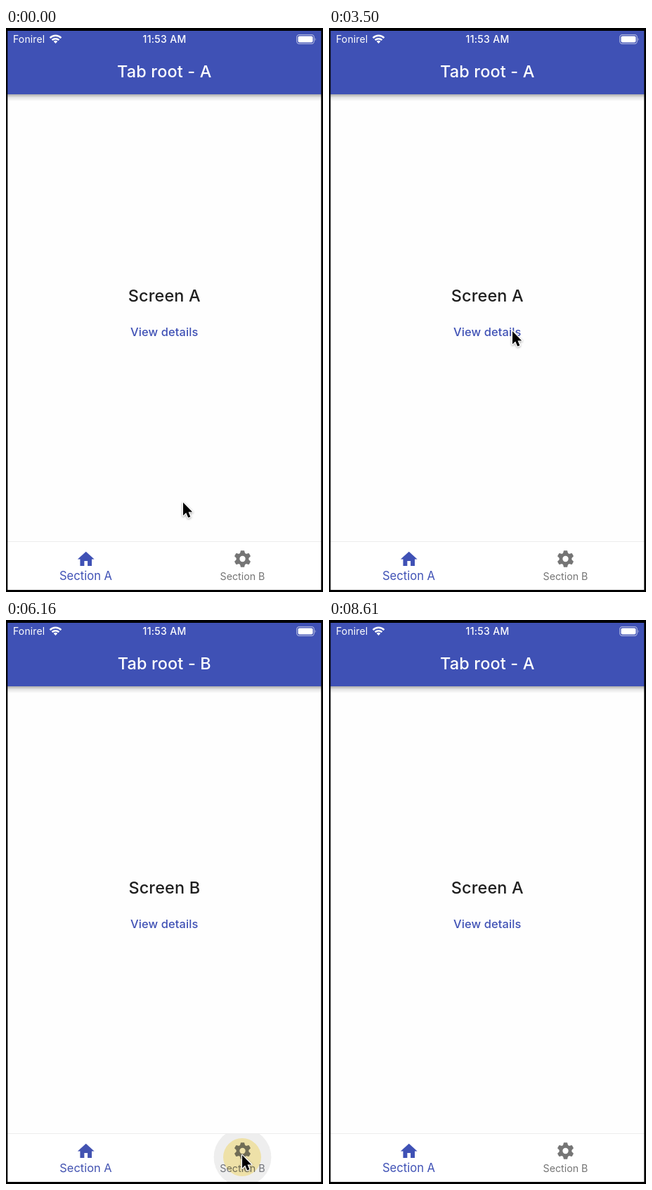
These frames come from a looping animation (451x800 px, 8680 ms). An HTML page:

```html
<!DOCTYPE html>
<html lang="en">
<head>
<meta charset="utf-8">
<title>Tab navigation</title>
<style>
  html, body { margin: 0; width: 100%; height: 100%; overflow: hidden; background: #000; }
  svg { display: block; width: 451px; height: 800px; font-family: Inter, Roboto, sans-serif; }
  text { text-anchor: middle; }
  .title { font-size: 23.4px; font-weight: 500; letter-spacing: .18px; }
  .button { font-size: 16.4px; font-weight: 500; letter-spacing: .13px; fill: #3f51b5; }
  .status { font-size: 14px; fill: #fff; }
  .ink { fill: #bcbcbc; }
</style>
</head>
<body>
<svg viewBox="0 0 451 800">
  <defs>
    <linearGradient id="drop" x2="0" y2="1">
      <stop stop-opacity=".32"/>
      <stop offset=".45" stop-opacity=".1"/>
      <stop offset="1" stop-opacity="0"/>
    </linearGradient>
    <linearGradient id="edge">
      <stop stop-opacity="0"/>
      <stop offset="1" stop-opacity=".12"/>
    </linearGradient>
    <clipPath id="navClip"><rect x="2" y="729" width="447" height="68"/></clipPath>
  </defs>

  <g id="pages"></g>

  <g id="nav">
    <rect y="728" width="451" height="72" fill="#ececec"/>
    <rect y="729" width="451" height="71" fill="#fff"/>
    <g clip-path="url(#navClip)"><g class="ink"></g></g>
    <g id="tabA">
      <path transform="translate(99.5 739.3) scale(1.187)" d="M10 20v-6h4v6h5v-8h3L12 3 2 12h3v8z"/>
      <text font-size="16.6">Section A</text>
    </g>
    <g id="tabB">
      <g id="gear" transform="translate(336.5 753) scale(1.187)">
        <circle r="5.5" fill="none" stroke-width="4"/>
      </g>
      <text font-size="16.6">Section B</text>
    </g>
  </g>

  <g id="statusBar">
    <text class="status" x="10" y="21" letter-spacing=".15" style="text-anchor:start">Fonirel</text>
    <g fill="none" stroke="#fff" stroke-width="2.5">
      <path d="M62.6 14.1a11.2 11.2 0 0 1 15.8 0M65.6 17.2a6.9 6.9 0 0 1 9.8 0"/>
      <path d="M70.5 22l-2.8-2.9a4 4 0 0 1 5.6 0z" fill="#fff" stroke="none"/>
    </g>
    <text class="status" x="225.5" y="21" font-weight="500" letter-spacing=".3">11:53 AM</text>
    <rect x="413.7" y="9.7" width="24.6" height="12.6" rx="3.6" fill="none" stroke="#fff" stroke-opacity=".55" stroke-width="1.2"/>
    <rect x="415.5" y="11.5" width="21" height="9" rx="2" fill="#fff"/>
    <path d="M439.6 13.7q2 2.3 0 4.6z" fill="#fff" fill-opacity=".55"/>
  </g>

  <path d="M0 0H451V800H0zM2.3 4V797H448.3V4z" fill-rule="evenodd"/>
  <circle id="halo" r="27" fill="#fff2b4" style="mix-blend-mode:multiply"/>
  <g id="cursor">
    <path d="M0 0V18.5L4.2 14.6 7.2 21.6 10.4 20.2 7.5 13.4H13.2Z" stroke="#fff" stroke-width="2.4"
      stroke-linejoin="round" paint-order="stroke" style="filter:drop-shadow(0 1.5px 1.5px rgba(0,0,0,.35))"/>
  </g>
</svg>

<script>
const LOOP = 8680, STEP = 70;
const $ = id => document.getElementById(id);
const clamp = v => Math.max(0, Math.min(1, v));
const mix = (a, b, k) => a + (b - a) * k;

function add(parent, tag, attrs) {
  const el = document.createElementNS('http://www.w3.org/2000/svg', tag);
  return parent.appendChild(set(el, attrs));
}
function set(el, attrs) {
  for (const key in attrs) el.setAttribute(key, attrs[key]);
  return el;
}

function bezier(x1, y1, x2, y2) {
  const at = (a, b, s) => 3 * a * s * (1 - s) ** 2 + 3 * b * s * s * (1 - s) + s ** 3;
  return x => {
    let lo = 0, hi = 1;
    for (let i = 0; i < 24; i++) {
      const mid = (lo + hi) / 2;
      if (at(x1, x2, mid) < x) lo = mid; else hi = mid;
    }
    return at(y1, y2, lo);
  };
}
const slideEase = bezier(.35, .91, .33, .97);
const tabEase = bezier(.4, 0, .2, 1);
const handEase = bezier(.42, 0, .58, 1);

function makePage(title, heading, button, isDetail) {
  const g = add($('pages'), 'g', {});
  g.innerHTML = `
    ${isDetail ? '<rect x="-20" width="22" height="800" fill="url(#edge)"/>' : ''}
    <rect x="2" width="447" height="800" fill="#fefefe"/>
    <rect x="2" y="94" width="447" height="10" fill="url(#drop)"/>
    <rect x="2" width="447" height="94" fill="#3f51b5"/>
    <g class="ink"></g>
    ${isDetail ? '<path d="M35 50.3L24 61.3 35 72.3" fill="none" stroke="#fff" stroke-width="3.2"/>' : ''}
    <text class="title" x="225.3" y="69.5" fill="#fff">${title}</text>
    <text class="title heading" x="225.3" y="387.5" fill="#1f1f1f">${heading}</text>
    <text class="button" x="225.3" y="436.5">${button}</text>`;
  return g;
}
const rootA = makePage('Tab root - A', 'Screen A', 'View details');
const rootB = makePage('Tab root - B', 'Screen B', 'View details');
const detail = makePage('Details Screen - A', '', 'Increment counter', true);
const heading = detail.querySelector('.heading');

for (let i = 0; i < 6; i++)
  add($('gear'), 'path', {
    d: 'M-3-6.5L-2.2-9.6Q-2.1-10-1.7-10H1.7Q2.1-10 2.2-9.6L3-6.5Z',
    transform: `rotate(${i * 60})`, stroke: 'none'
  });

// Touch targets: host group, x, y, width, height, corner radius
const tabA = [$('nav'), 72.5, 721, 82, 82, 41];
const tabB = [$('nav'), 295.5, 721, 82, 82, 41];
const view = [rootA, 158, 409, 134, 43, 2.5];
const more = [detail, 132, 409, 186, 43, 2.5];
const back = [detail, -13, 20, 82, 82, 41];

const taps = [
  [tabB, 1600, 1720], [tabA, 2480, 2590], [view, 3560, 3680],
  [more, 4740, 4830], [more, 5020, 5110],
  [tabB, 5960, 6130], [tabA, 7010, 7130], [back, 8130, 8200]
].map(([[host, x, y, width, height, rx], down, up], i) => {
  const box = { x, y, width, height, rx };
  const group = add(host.querySelector('.ink'), 'g', { 'clip-path': `url(#spot${i})` });
  add(add(group, 'clipPath', { id: 'spot' + i }), 'rect', box);
  const glow = add(group, 'rect', box);
  const splash = add(group, 'circle', {});
  return { down, up, width, group, glow, splash };
});

// Pointer moves: start, end, control point, destination
const start = [252, 673];
const moves = [
  [910, 1400, 262, 760, 338, 752],
  [1960, 2450, 225, 735, 113, 761],
  [2730, 3360, 345, 640, 261, 430],
  [4060, 4480, 290, 455, 243, 428],
  [5250, 5740, 330, 560, 336, 759],
  [6440, 6930, 225, 740, 113, 761],
  [7280, 7910, 120, 110, 36, 66],
  [8280, 8560, 130, 500, 160, 840]
];

function pointer(t) {
  let [x, y] = start;
  for (const [from, to, cx, cy, ex, ey] of moves) {
    if (t < from) break;
    const k = handEase(clamp((t - from) / (to - from)));
    x = mix(mix(x, cx, k), mix(cx, ex, k), k);
    y = mix(mix(y, cy, k), mix(cy, ey, k), k);
    if (t < to) break;
  }
  return [x, y];
}

function drawTab(tab, x, on) {
  const color = `rgb(${mix(117, 63, on)},${mix(117, 81, on)},${mix(117, 181, on)})`;
  set(tab, { fill: color, stroke: 'none' });
  tab.querySelectorAll('circle').forEach(c => set(c, { stroke: color }));
  set(tab.querySelector('text'), {
    transform: `translate(${x} 787) scale(${mix(12 / 14, 1, on)}) translate(0 -4.2)`
  });
}

function draw(t) {
  const push = slideEase(clamp((t - 3680) / 400)) - slideEase(clamp((t - 8200) / 400));
  const onB = (t >= 1720 && t < 2590) || (t >= 6130 && t < 7130);
  const show = (page, visible, x) =>
    set(page, { visibility: visible ? 'visible' : 'hidden', transform: `translate(${x} 0)` });
  show(rootA, !onB && push < 1, -149 * push);
  show(rootB, onB, 0);
  show(detail, !onB && push > 0, 447 * (1 - push));
  heading.textContent = 'Details for A - Counter: ' + ((t >= 4830) + (t >= 5110));

  const turn = at => tabEase(clamp((t - at) / 200));
  const selected = turn(1720) - turn(2590) + turn(6130) - turn(7130);
  drawTab($('tabA'), 113.5, 1 - selected);
  drawTab($('tabB'), 336.5, selected);

  const [x, y] = pointer(t);
  let halo = 0;
  for (const { down, up, width, group, glow, splash } of taps) {
    const fade = t < down ? 0 : clamp(1 - (t - up) / 250);
    set(group, { opacity: fade });
    if (!fade) continue;
    set(glow, { opacity: .2 * clamp((t - down) / 150) });
    set(splash, { cx: x, cy: y, r: width * .7 * clamp((t - down) / 250), opacity: .13 });
    halo = Math.max(halo, clamp((up + 140 - t) / 80));
  }
  set($('halo'), { cx: x, cy: y + 3, opacity: halo });
  set($('cursor'), { transform: `translate(${x} ${y})` });
}

const begin = performance.now();
function tick() {
  const t = Math.max(0, performance.now() - begin) % LOOP;
  draw(Math.floor(t / STEP) * STEP);
  requestAnimationFrame(tick);
}
tick();
</script>
</body>
</html>
```
